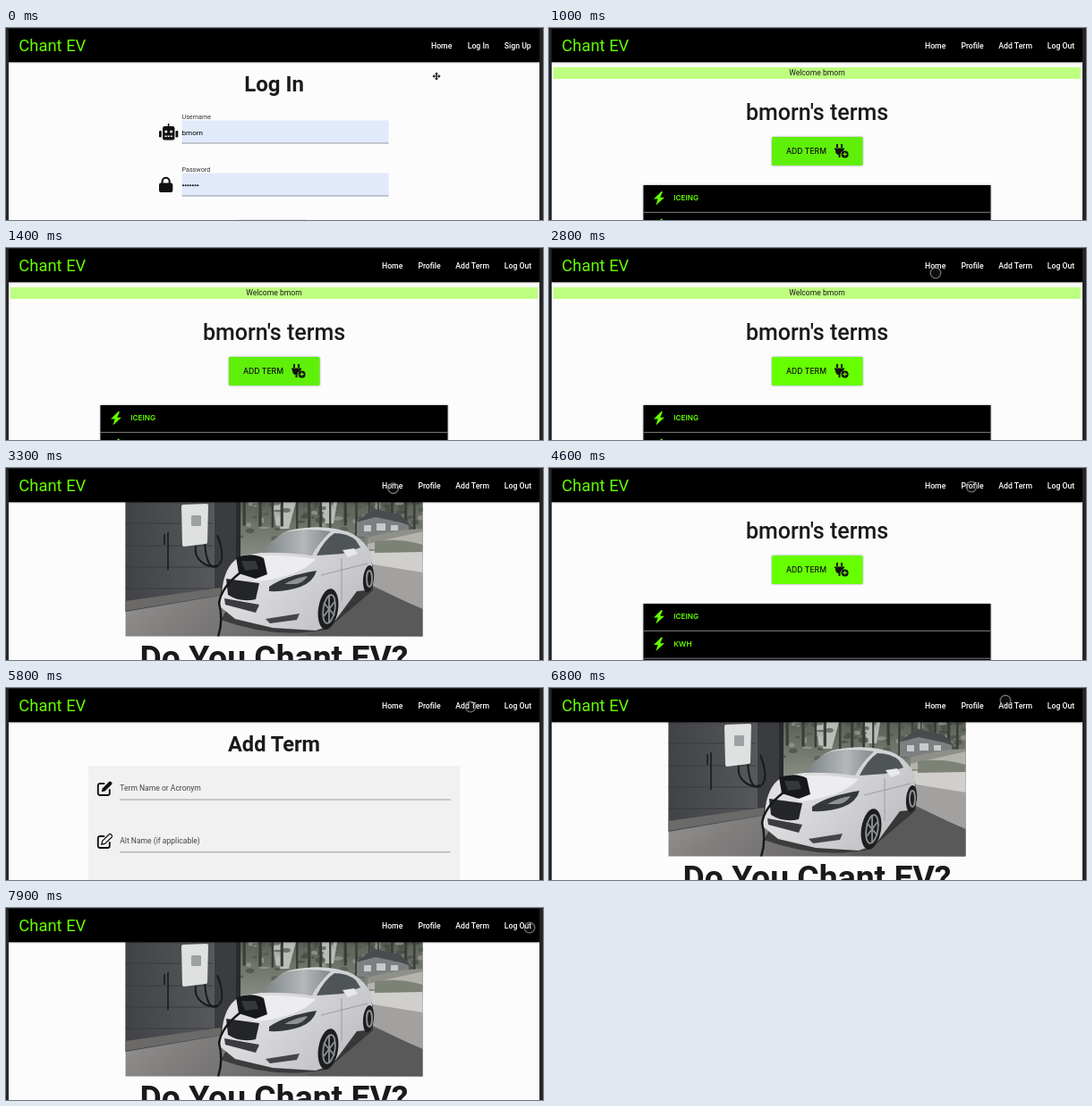
Write an HTML page that moves like this. It is 600x215 px and loops after 8 s.

```html
<!DOCTYPE html>
<html lang="en">
<head>
<meta charset="utf-8">
<title>Chant EV</title>
<style>
  html, body { margin: 0; width: 100%; height: 100%; overflow: hidden; background: #262626; }
  #stage { display: block; width: 600px; height: 215px; font-family: Roboto, "Open Sans", sans-serif; }
  .nav { font-size: 8.7px; font-weight: 500; fill: #fff; }
  .brand { font-size: 18.4px; fill: #6f0; }
  .title { font-weight: 700; fill: #1a1a1a; text-anchor: middle; }
  .label { font-size: 7.2px; fill: #333; }
  .hint { font-size: 8.55px; fill: #444; }
  .term { font: 600 8.2px Inter, sans-serif; fill: #6f0; }
  .button { font: 500 8.6px Inter, sans-serif; fill: #111; }
  .soft { filter: drop-shadow(0 .8px 1.2px rgba(0, 0, 0, .4)); }
</style>
</head>
<body>
<svg id="stage" viewBox="0 0 600 215">
  <defs>
    <linearGradient id="wall"><stop stop-color="#404246"/><stop offset="1" stop-color="#5b5d60"/></linearGradient>
    <linearGradient id="floor" x2="1" y2=".5"><stop stop-color="#aaa8a6"/><stop offset=".5" stop-color="#807e7d"/><stop offset="1" stop-color="#5a5959"/></linearGradient>
    <linearGradient id="woods" x2="0" y2="1"><stop stop-color="#5a6056"/><stop offset="1" stop-color="#8d9186"/></linearGradient>
    <linearGradient id="paint" x2="1" y2=".6"><stop stop-color="#e4e4e6"/><stop offset=".4" stop-color="#dcdcdf"/><stop offset="1" stop-color="#bfc0c4"/></linearGradient>
    <linearGradient id="glass" x2="1"><stop stop-color="#7b8184"/><stop offset=".6" stop-color="#b4b8b9"/><stop offset="1" stop-color="#83888a"/></linearGradient>

    <path id="bolt" d="M8.5 0 0 8.6h4.6L2.5 15.5 12 6.7H7.2L10 .4Z" fill="#6f0"/>
    <g id="plug" fill="#111">
      <path d="M3 0h2v4h-2zM8 0h2v4h-2zM1 4.6h11v1.6h-1v1.3a5 5 0 0 0-3.4 4.3H7.5V15H5.5v-3.1A4.7 4.7 0 0 1 2 7.4V6.2H1z"/>
      <circle cx="12.6" cy="11.4" r="4"/>
      <path d="M12.6 9.2v4.4M10.4 11.4h4.4" stroke="#6f0" stroke-width="1.1"/>
    </g>
    <path id="square" d="M8 3H3.5A2.2 2.2 0 0 0 1.3 5.2v8.6A2.2 2.2 0 0 0 3.5 16h8.6a2.2 2.2 0 0 0 2.2-2.2V10" fill="none" stroke="#111" stroke-width="1.9" stroke-linecap="round"/>
    <path id="pen" d="M5.2 12.2 6.2 8.4 13.6 1a1.6 1.6 0 0 1 2.2 0L16.6 1.8a1.6 1.6 0 0 1 0 2.2L9 11.4Z"/>
  </defs>

  <rect width="600" height="215" fill="#262626"/>
  <rect x="3" y="1" width="593" height="214" fill="#fcfcfc"/>

  <g id="login">
    <text class="title" x="299.5" y="71" font-size="24">Log In</text>
    <g fill="#111">
      <path d="M180.8 107h1.6v3.5h-1.6z"/>
      <rect x="175" y="110" width="13.4" height="15.5" rx="2.2"/>
      <rect x="171" y="115" width="2.8" height="7.5" rx="1.2"/>
      <rect x="189.5" y="115" width="2.8" height="7.5" rx="1.2"/>
    </g>
    <g fill="#fcfcfc">
      <circle cx="178.8" cy="116" r="1.5"/><circle cx="184.6" cy="116" r="1.5"/>
      <path d="M177.6 120.5h2v1.4h-2zM180.7 120.5h2v1.4h-2zM183.8 120.5h2v1.4h-2z"/>
    </g>
    <rect x="171" y="173.5" width="15.3" height="10.5" rx="2" fill="#111"/>
    <path d="M174.6 174.5v-2.7a4.05 4.05 0 0 1 8.1 0v2.7" fill="none" stroke="#111" stroke-width="2.1"/>
    <text class="label" x="196.5" y="102.4">Username</text>
    <text class="label" x="196.5" y="161.2">Password</text>
    <path d="M196.5 103.5h231v25.5h-231zM196.5 162.5h231v25.5h-231z" fill="#e1eafb"/>
    <path d="M196.5 129h231M196.5 188h231" stroke="#8b8e94" stroke-width=".9"/>
    <text x="196.5" y="119.6" font-size="8.1">bmorn</text>
    <path d="M198 176.2h17" stroke="#111" stroke-width="2.1" stroke-linecap="round" stroke-dasharray="0 2.72"/>
    <path d="M260 214.6h75" stroke="#e4e4e4"/>
  </g>

  <g id="profile">
    <g id="welcome">
      <rect x="5" y="44" width="589" height="13" fill="#beff80"/>
      <text x="299.5" y="53.4" font-size="8.6" text-anchor="middle" fill="#1a1a1a">Welcome bmorn</text>
    </g>
    <g id="terms">
      <text class="title" x="299.5" y="103.3" font-size="25" style="font-weight:500">bmorn's terms</text>
      <rect id="add" class="soft" x="249" y="122" width="101.5" height="32" rx="1.5"/>
      <text class="button" x="265" y="141">ADD TERM</text>
      <use href="#plug" x="318" y="130"/>
      <rect class="soft" x="105.5" y="176" width="388" height="80"/>
      <path d="M105.5 206.4h388M105.5 237.2h388" stroke="#8e8e8e" stroke-width=".9"/>
      <use href="#bolt" x="117" y="183"/>
      <text class="term" x="139.3" y="193.4">ICEING</text>
      <use href="#bolt" x="117" y="213.5"/>
      <text class="term" x="139.3" y="224.1">KWH</text>
    </g>
  </g>

  <g id="form">
    <text class="title" x="299.5" y="71" font-size="23.6">Add Term</text>
    <rect x="92" y="87" width="415" height="128" fill="#f1f1f1"/>
    <use href="#square" x="101.5" y="104"/>
    <use href="#pen" x="101.5" y="104" fill="#111"/>
    <use href="#square" x="101.5" y="163"/>
    <use href="#pen" x="101.5" y="163" fill="#f1f1f1" stroke="#111" stroke-width="1.2"/>
    <text class="hint" x="127.3" y="115.4">Term Name or Acronym</text>
    <text class="hint" x="127.3" y="174.2">Alt Name (if applicable)</text>
    <path d="M127 125h369.5M127 183.8h369.5" stroke="#8f8f8f" stroke-width=".9"/>
  </g>

  <g id="home">
    <svg x="133.5" y="38" width="332" height="150.5" viewBox="133.5 38 332 150.5">
      <rect x="133" y="38" width="333" height="151" fill="url(#floor)"/>
      <rect x="255" y="38" width="211" height="68" fill="url(#woods)"/>
      <path d="M298 38h26l-8 30h-14zM350 38h20l-4 24h-10z" fill="#d3d8d6" opacity=".75"/>
      <g id="leaves"></g>
      <g id="trunks" stroke="#3a3d38"></g>
      <path d="M392 60 412 47l28 6 10 12v12h-58z" fill="#7d8080"/>
      <path d="M390 61 411 46l30 6 12 13-12-4-28-6z" fill="#494c4e"/>
      <path d="M400 64h8v7h-8zM414 62h10v8h-10zM430 64h8v6h-8z" fill="#c6caca"/>
      <path d="M404 78q30-9 62-10v22h-62z" fill="#8f908a"/>
      <path d="M404 85 466 71v20h-62z" fill="#b5b3ae"/>
      <path d="M404 93 466 90v31l-56-12z" fill="#d0cfcb"/>
      <path d="M412 82q28-4 54 4v8l-54 1z" fill="#7c8376"/>
      <path d="M410 108 466 117v42l-56-27z" fill="#a3a19f"/>
      <path d="M133 38h124v102l-124 21z" fill="url(#wall)"/>
      <path d="M133 62h98M133 87h98M133 111h98M133 135h98" stroke="#393b3e"/>
      <path d="M233 38h29v98l-29 5z" fill="#3a3c3f"/>
      <path d="M257 38h5v66h-5z" fill="#282a2c"/>
      <path d="M133 149 240 134v8l-107 18z" fill="#6b6a69"/>
      <path d="M335 188 411 135l55 23v31z" fill="#5a5959"/>
      <path d="M222 82c1 22 6 32 14 28 9-5 5-23 0-35M212 87c-3 15 12 26 24 22" fill="none" stroke="#191a1b" stroke-width="2"/>
      <path d="M181 72v42M177 74v12" stroke="#222426" stroke-width="2"/>
      <path d="M198 41 224 40q2 0 2 2l-1 41q0 2-2 2l-24 3q-2 0-2-2l-1-43q0-2 2-2z" fill="#dfe0e0"/>
      <rect x="207" y="53" width="11" height="12" rx="1" fill="#9da1a3"/>

      <path d="M240 170q60 22 118 11l52-44v-12l-160 28z" fill="#2b2b2c" opacity=".75"/>
      <path d="M242 132q4-26 22-34l28-4q8-18 24-24 42-9 72 4 14 9 20 22l2 27-8 14-10 1-28 38-18 6-48-3-42-10-17-14z" fill="url(#paint)"/>
      <path d="M286 95q13-18 29-24 25-4 48 0-14 13-21 27-30-4-56-3z" fill="url(#glass)"/>
      <path d="M347 98q9-18 20-25 15 0 24 8l5 8-20 7z" fill="#4f5456"/>
      <path d="M376 92l13-2 4 6-11 4z" fill="#e8e8e9"/>
      <path d="M272 99q38-3 74 3-11 11-27 17-26 8-41 8z" fill="#ededef"/>
      <path d="M257 100q18-6 31 1l4 18-13 5-19-6z" fill="#17181a"/>
      <path d="M263 104h16l3 9-15 2z" fill="#35383b"/>
      <path d="M294 133q16-12 53-18-4 13-18 18-16 6-35 5z" fill="#34383b"/>
      <path d="M311 130q12-7 26-9-4 7-13 9z" fill="#8b9194"/>
      <path d="M246 124 283 129l-4 18q-17 4-31-5z" fill="#232528"/>
      <path d="M244 146 283 153l-4 9-34-9z" fill="#3a3c3f"/>
      <path d="M290 169l38-6-3 7-30 4z" fill="#444649"/>
      <path d="M352 120q28-7 52-13M375 101v48" fill="none" stroke="#97989b" stroke-width=".9"/>
      <g fill="#1d1e20">
        <ellipse cx="360" cy="158" rx="11" ry="23" transform="rotate(9 360 158)"/>
        <ellipse cx="405" cy="124" rx="6" ry="15" transform="rotate(6 405 124)"/>
      </g>
      <g fill="none" stroke="#8f9193" stroke-width="1.8">
        <ellipse cx="361" cy="158" rx="6.5" ry="16" transform="rotate(9 361 158)"/>
        <path d="M361 142v32M355 151l12 14M367 150l-12 16"/>
        <ellipse cx="406" cy="124" rx="3" ry="9"/>
      </g>
      <path d="M262 117q-21 16-24 34 5 20-1 38" fill="none" stroke="#161718" stroke-width="2.4"/>
    </svg>
    <text class="title" x="299.5" y="224.5" font-size="37.3">Do You Chant EV?</text>
  </g>

  <g id="bar">
    <rect class="soft" x="3" y="1" width="593" height="37.3"/>
    <text class="brand" x="14.3" y="26">Chant EV</text>
    <g class="nav" id="guest"></g>
    <g class="nav" id="member"></g>
  </g>

  <g id="cursor">
    <g id="cross" stroke="#111" stroke-width="1.2" fill="#111">
      <path d="M-3 0h6M0-3v6"/>
      <path stroke="none" d="M0-4.6 2-2.3h-4zM0 4.6 2 2.3h-4zM-4.6 0-2.3 2v-4zM4.6 0 2.3 2v-4z"/>
    </g>
    <circle id="ring" r="5.8" fill="rgba(110,110,110,.12)" stroke="#808080" stroke-opacity=".9" stroke-width="1.3"/>
  </g>
</svg>
<script>
const LOOP = 8000, STEP = 100;
const $ = id => document.getElementById(id);
const show = (id, on) => { $(id).style.display = on ? "" : "none"; };

function add(parent, tag, attrs, text = "") {
  const el = document.createElementNS("http://www.w3.org/2000/svg", tag);
  for (const key in attrs) el.setAttribute(key, attrs[key]);
  el.textContent = text;
  parent.append(el);
}

const menus = {
  guest: [["Home", 475], ["Log In", 515.7], ["Sign Up", 556.8]],
  member: [["Home", 420], ["Profile", 460.4], ["Add Term", 502.3], ["Log Out", 556.8]]
};
for (const id in menus)
  for (const [word, x] of menus[id]) add($(id), "text", { x, y: 22.6 }, word);

// Woods behind the car: scattered foliage and a row of trunks.
let seed = 7;
const rnd = () => (seed = seed * 16807 % 2147483647) / 2147483647;
for (let i = 0; i < 110; i++) {
  const fill = ["#3f463c", "#4f564b", "#a3a9a0"][i % 3];
  add($("leaves"), "ellipse", { cx: 262 + rnd() * 204, cy: 38 + rnd() * 42, rx: 2 + rnd() * 4, ry: 1 + rnd() * 2.5, fill, opacity: .6 });
}
for (let i = 0; i < 15; i++)
  add($("trunks"), "path", { d: `M${266 + i * 13.5 + rnd() * 6} 38v${24 + rnd() * 14}`, "stroke-width": 1.5 + rnd() * 2 });

// [start ms, page]
const pages = [[0, "login"], [1000, "profile"], [2900, "home"], [4400, "profile"], [5500, "form"], [6400, "home"]];

// [ms, x, y]
const track = [
  [0, 481, 54], [100, 487, 46], [600, 307, 224], [1700, 307, 224], [1800, 309, 191],
  [2600, 432, 28], [2800, 432, 28], [3000, 432, 24], [3500, 433, 22], [4000, 473, 20],
  [4600, 472, 21], [5100, 519, 21], [5800, 519, 21], [5900, 527, 13], [6200, 433, 20],
  [6500, 433, 20], [7100, 587, 8], [7200, 588, 9], [7500, 585, 22], [LOOP, 585, 22]
];

function cursorAt(t) {
  const i = track.findIndex(p => p[0] > t);
  const [t0, x0, y0] = track[i - 1], [t1, x1, y1] = track[i];
  const u = (t - t0) / (t1 - t0), k = u * u * (3 - 2 * u);
  return [x0 + (x1 - x0) * k, y0 + (y1 - y0) * k];
}

function draw(t) {
  const page = pages.filter(p => p[0] <= t).pop()[1];
  for (const id of ["login", "profile", "form", "home"]) show(id, id === page);
  show("guest", page === "login");
  show("member", page !== "login");

  const greeted = t < 2900;
  show("welcome", greeted);
  $("terms").setAttribute("transform", `translate(0 ${greeted ? 0 : -24})`);
  $("add").setAttribute("fill", t < 1800 ? "#5ff00a" : "#6f0");

  const [x, y] = cursorAt(t);
  $("cursor").setAttribute("transform", `translate(${x} ${y})`);
  show("cross", t < 100);
  show("ring", t >= 100);
}

const start = performance.now();
function tick() {
  const t = (performance.now() - start) % LOOP;
  draw(Math.floor(t / STEP) * STEP);
  requestAnimationFrame(tick);
}
tick();
</script>
</body>
</html>
```
